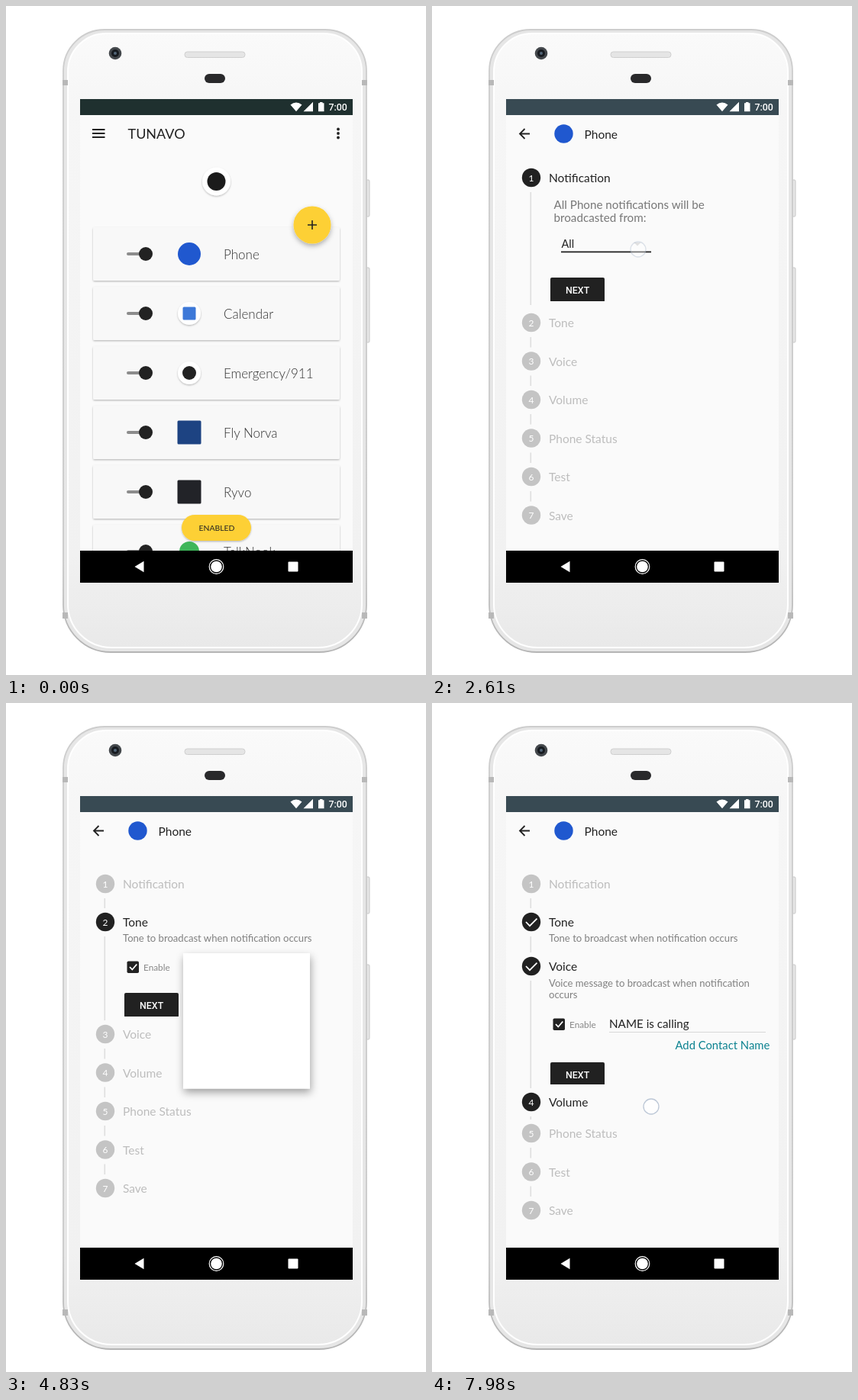
These frames come from a looping animation (550 by 877 pixels, 8 s). An HTML page:

```html
<!DOCTYPE html>
<html lang="en">
<head>
<meta charset="utf-8">
<title>Notification setup</title>
<style>
  html, body { margin: 0; width: 100%; height: 100%; overflow: hidden; background: #fff; }
  svg { display: block; }
  text { font-family: Lato, sans-serif; font-size: 15.5px; fill: #222; white-space: pre; }
  .app { font-size: 17px; font-weight: 300; fill: #333; }
  .title { font-size: 18px; }
  .pill { font-size: 10.4px; }
  .small { font-size: 13.1px; fill: #808080; }
  .tiny { font-size: 11.8px; fill: #888; }
  .note { font-size: 15.2px; fill: #777; }
  .item { font-size: 14.5px; }
  .link { font-size: 14.8px; fill: #0b8290; }
  .roboto { font-family: Roboto, sans-serif; font-weight: 500; font-size: 12.4px; fill: #fff; }
  .num { font-size: 12px; fill: #fff; text-anchor: middle; }
</style>
</head>
<body>
<svg id="stage" width="100%" height="100%" viewBox="0 0 550 877">
  <defs>
    <linearGradient id="shell" x2="0" y2="1">
      <stop offset="0" stop-color="#fafafa"/><stop offset=".12" stop-color="#f6f6f6"/>
      <stop offset=".85" stop-color="#f1f1f1"/><stop offset="1" stop-color="#e9e9e9"/>
    </linearGradient>
    <linearGradient id="rim" x2="0" y2="1">
      <stop offset="0" stop-color="#cdcdcd"/><stop offset=".85" stop-color="#c9c9c9"/><stop offset="1" stop-color="#b4b4b4"/>
    </linearGradient>
    <filter id="soft" x="-30%" y="-30%" width="160%" height="170%">
      <feDropShadow dx="0" dy="1.2" stdDeviation="1.1" flood-opacity=".27"/>
    </filter>
    <filter id="lift" x="-30%" y="-30%" width="160%" height="170%">
      <feDropShadow dx="0" dy="3" stdDeviation="3" flood-opacity=".3"/>
    </filter>
    <filter id="float" x="-30%" y="-30%" width="160%" height="160%">
      <feDropShadow dx="1" dy="5" stdDeviation="5.5" flood-opacity=".36"/>
    </filter>
    <clipPath id="screenClip"><rect x="97" y="122" width="357" height="634"/></clipPath>
  </defs>

  <g id="phone">
    <path d="M472 228h3q1 0 1 2v44q0 2-1 2h-3zM472 343h3q1 0 1 2v94q0 2-1 2h-3z" fill="#e6e6e6" stroke="#c8c8c8"/>
    <path d="M366 30h8v4h-8z" fill="#9b9b9b"/>
    <path d="M75 85A54 54 0 0 1 129 31H418A54 54 0 0 1 472 85V785A62 62 0 0 1 410 847H137A62 62 0 0 1 75 785Z" fill="#e6e6e6" stroke="url(#rim)" stroke-width="1.8"/>
    <path d="M81 86A50 50 0 0 1 131 36H416A50 50 0 0 1 466 86V784A57 57 0 0 1 409 841H138A57 57 0 0 1 81 784Z" fill="url(#shell)" stroke="#fff" stroke-width="2"/>
    <path d="M74 97h7v7h-7zM466 97h7v7h-7zM74 795h7v8h-7zM466 795h7v8h-7z" fill="#b8b8b8"/>
    <circle cx="143" cy="62" r="8.3" fill="#44484c"/>
    <circle cx="143" cy="62" r="5" fill="#171b20"/>
    <circle cx="143" cy="62" r="2" fill="#536678"/>
    <rect x="234" y="60" width="79" height="7.5" rx="3.5" fill="#e5e5e5" stroke="#cfcfcf"/>
    <rect x="260" y="89" width="27" height="12" rx="6" fill="#29292b"/>
  </g>

  <g clip-path="url(#screenClip)">
    <rect x="97" y="122" width="357" height="592" fill="#fafafa"/>
    <rect x="97" y="122" width="357" height="21" fill="#1f302f"/>
    <g id="list"></g>
    <rect x="97" y="714" width="357" height="42"/>
    <g id="page">
      <rect x="97" y="122" width="357" height="592" fill="#fafafa"/>
      <rect x="97" y="122" width="357" height="21" fill="#384a53"/>
      <path d="M128 167.500H115.500M121.500 161l-6.500 6.500 6.500 6.500" fill="none" stroke="#222" stroke-width="1.800"/>
      <circle cx="172.500" cy="167.500" r="12.200" fill="#2058cf"/>
      <text x="199.500" y="173.500">Phone</text>
      <g id="steps"></g>
      <g id="menu"></g>
    </g>
    <path d="M168.500 735l12-7.300v14.600z" fill="#fff"/>
    <circle cx="275.500" cy="735" r="7.300" fill="#fff"/>
    <circle cx="275.500" cy="735" r="9.300" fill="none" stroke="#fff" stroke-width="1.200"/>
    <rect x="369.500" y="728.500" width="13" height="13" rx="1" fill="#fff"/>
    <path d="M372.500 129.500q7.500-6 15 0l-7.500 8.800zM389.500 138.300h12.500v-12.500zM409 127.300h2v-1.300h3.500v1.300h2v11h-7.500z" fill="#fff"/>
    <text class="roboto" x="422.500" y="137">7:00</text>
    <circle id="touch" r="10" fill="#fff" fill-opacity=".75" stroke="#bcc7d6" stroke-width="1.300"/>
  </g>
</svg>
<script>
const LOOP = 8000;
const $ = id => document.getElementById(id);
const set = (el, attrs) => { for (const k in attrs) el.setAttribute(k, attrs[k]); };
const clamp = v => Math.min(1, Math.max(0, v));
const span = (t, from, to) => clamp((t - from) / (to - from));
const inOut = p => p < .5 ? 2 * p * p : 1 - 2 * (1 - p) ** 2;
const ease = (t, from, to) => inOut(span(t, from, to));
const mix = (a, b, p) => a + (b - a) * p;
const text = (x, y, str, cls = '') => `<text x="${x}" y="${y}" class="${cls}">${str}</text>`;
const line = (x1, x2, y) => `<rect x="${x1}" y="${y}" width="${x2 - x1}" height="1" fill="#d8d8d8"/>`;
const caret = (x, y) => `<path d="M${x - 4.5} ${y - 2}h9l-4.5 4.5z" fill="#cfcfcf"/>`;

// App list
const disc = (x, y, r, fill) => `<circle cx="${x}" cy="${y}" r="${r}" fill="${fill}"/>`;
const badge = (x, y, r, inner) => `<circle cx="${x}" cy="${y}" r="${r}" fill="#fff" filter="url(#soft)"/>${inner}`;
const square = (x, y, size, fill) =>
  `<rect x="${x - size / 2}" y="${y - size / 2}" width="${size}" height="${size}" rx="1.5" fill="${fill}"/>`;
const apps = [
  ['Phone', y => disc(240, y, 15, '#2058cf')],
  ['Calendar', y => badge(240, y, 15, square(240, y, 17, '#3d78d8'))],
  ['Emergency/911', y => badge(240, y, 15, disc(240, y, 9, '#222'))],
  ['Fly Norva', y => square(240, y, 31, '#1d4382')],
  ['Ryvo', y => square(240, y, 31, '#222328')],
  ['TalkNook', y => disc(240, y, 13, '#3fb65a')]
];
$('list').innerHTML =
  '<path d="M113 162h16.5M113 167h16.5M113 172h16.5" stroke="#222" stroke-width="1.8"/>' +
  text(159.5, 173.5, 'TUNAVO', 'title') +
  [161.5, 167, 172.5].map(y => disc(435, y, 1.9, '#222')).join('') +
  badge(275.5, 230, 18.5, disc(275.5, 230, 12, '#1b1b1b')) +
  apps.map(([name, icon], i) => {
    const y = 325 + 78 * i;
    return `<rect x="114" y="${y - 35}" width="323" height="70" rx="2" fill="#f8f8f8" filter="url(#soft)"/>
      <rect x="158" y="${y - 2}" width="25" height="4" rx="2" fill="#8c8c8c"/>` +
      disc(183, y, 9, '#222') + icon(y) + text(285, y + 6.5, name, 'app');
  }).join('') +
  `<circle cx="401" cy="287" r="24.5" fill="#fdd036" filter="url(#lift)"/>
   <path d="M395 287h12M401 281v12" stroke="#222" stroke-width="1.6"/>
   <rect x="230" y="667" width="91" height="34" rx="17" fill="#fdd036" filter="url(#soft)"/>` +
  text(252.5, 688, 'ENABLED', 'pill');

// Stepper; every panel is drawn relative to the centre of its step
const enable = y => `<rect x="158.5" y="${y - 7.5}" width="15.5" height="15.5" rx="1.8" fill="#222"/>
  <path d="M162 ${y}l3.3 3.5 6-7" fill="none" stroke="#fff" stroke-width="1.8"/>` +
  text(180, y + 4.5, 'Enable', 'tiny');
const panels = [
  { head: 12, foot: 28, buttonTop: 130, notes: '',
    row: text(159.5, 40.5, 'All Phone notifications will be', 'note') +
      text(159.5, 58, 'broadcasted from:', 'note') + text(169.5, 91.5, 'All', 'item') +
      caret(269, 87) + '<rect id="focus" x="169" width="118"/>' },
  { head: 26, foot: 23, buttonTop: 93,
    notes: text(153, 26, 'Tone to broadcast when notification occurs', 'small'),
    row: enable(59) + text(232, 64.5, 'PA', 'item') + line(232, 380, 69.5) +
      `<g id="toneCaret">${caret(362.5, 59)}</g>` },
  { head: 42, foot: 23, buttonTop: 126,
    notes: text(153, 26.5, 'Voice message to broadcast when notification', 'small') +
      text(153, 41.5, 'occurs', 'small'),
    row: enable(76) + '<text id="typed" class="note" x="232" y="80.5" style="fill:#222"></text>' +
      `<g id="voiceLine">${line(232, 437, 86)}</g>` +
      text(318.5, 109, 'Add Contact Name', 'link') }
];
const names = ['Notification', 'Tone', 'Voice', 'Volume', 'Phone Status', 'Test', 'Save'];
$('steps').innerHTML = names.map((name, i) => {
  const p = panels[i];
  return `<g id="step${i}"><rect id="rail${i}" x="128.5" y="19" width="1.6" fill="#dedede"/>
    <circle id="dot${i}" cx="130" r="12.2"/>
    <text id="num${i}" class="num" x="130" y="4.5">${i + 1}</text>
    <path id="tick${i}" d="M123 0l5 5.2 9.5-9.5" fill="none" stroke="#fff" stroke-width="1.7"/>
    <text id="name${i}" x="153" y="6">${name}</text>` +
    (p ? `<g id="notes${i}">${p.notes}</g>
      <svg id="row${i}" width="550">${p.row}</svg>
      <svg id="next${i}" x="155" width="71"><rect width="71" height="32" rx="2" fill="#212121"/>
      <text class="roboto" x="20" y="20.5">NEXT</text></svg>` : '') + '</g>';
}).join('');

// Tone menu
$('menu').innerHTML =
  '<rect id="sheet" x="232" y="328" width="166" fill="#fff" filter="url(#float)"/><g id="items">' +
  ['Tickle', 'Call', 'Calendar', 'Tulip - Ottila Renn', 'Emergency', 'PA', 'SMS'].map((name, i) => {
    const y = 349.5 + 41.6 * i, on = name === 'PA';
    return text(239, y + 5.5, name, 'item') +
      `<circle cx="377" cy="${y}" r="7.8" fill="none" stroke="${on ? '#222' : '#d6d6d6'}" stroke-width="${on ? 1.8 : 1.3}"/>` +
      (on ? disc(377, y, 4.3, '#222') : '');
  }).join('') + '</g>';

// Touch path: time, x, y, opacity
const touches = [
  [1290, 300, 325, 0], [1350, 300, 325, 1], [1500, 300, 325, 0],
  [2010, 437, 404, 0], [2040, 430, 400, 1], [2310, 270, 319, 1], [2460, 270, 319, 1], [2760, 270, 319, 0],
  [3239, 466, 404, 0], [3240, 464, 404, 1], [3540, 190, 371, 1], [3780, 190, 371, 1], [4020, 466, 440, 1], [4021, 466, 440, 0],
  [4410, 362, 347, 0], [4500, 362, 347, 1], [4650, 362, 347, 1], [4800, 362, 347, 0],
  [5639, 449, 404, 0], [5640, 449, 404, 1], [5940, 190, 396, 1], [6450, 190, 396, 1], [6600, 313, 446, 1], [6690, 380, 472, 0],
  [7799, 190, 478, 0], [7830, 190, 478, 1], [7980, 287, 529, 1], [8000, 287, 529, 1]
];
function drawTouch(t) {
  const i = touches.findIndex(k => k[0] > t);
  const b = touches[i], a = touches[i - 1] || b;
  const p = a === b ? 0 : span(t, a[0], b[0]);
  set($('touch'), { cx: mix(a[1], b[1], p), cy: mix(a[2], b[2], p), opacity: mix(a[3], b[3], p) });
}

function drawPanel(i, open, gap, closing, buttonHeight = 31) {
  const { head, foot, buttonTop } = panels[i];
  const tall = buttonHeight * (closing ? open ** 1.4 : clamp(2 * open - 1));
  const top = gap - foot - tall;
  const rowEnd = open === 1 ? top : head + (buttonTop - head) * open ** 1.4;
  const visibility = open > .02 ? 'visible' : 'hidden';
  set($('row' + i), { height: Math.max(0, rowEnd), visibility });
  set($('next' + i), { y: top, height: tall < 1 ? 0 : tall, visibility });
}

function drawSteps(t) {
  const toTone = ease(t, 3780, 4140), toneOpen = ease(t, 3780, 4050);
  const toVoice = ease(t, 6510, 6690), toVolume = ease(t, 7800, 7970);
  const current = t < 3800 ? 0 : t < 6510 ? 1 : t < 7830 ? 2 : 3;
  const gaps = [
    t < 3780 ? 190 : 50 + 128 * (1 - toTone),
    mix(mix(50.5, 147, toneOpen), 58, toVoice),
    mix(mix(50.5, 171, toVoice), 178, toVolume),
    mix(50.5, 41, toVolume), 50.5, 50.5, 0
  ];
  let y = t < 3780 ? 225 : 237;
  names.forEach((_, i) => {
    const done = i > 0 && i < current, active = i === current || done;
    set($('step' + i), { transform: `translate(0 ${y})` });
    set($('rail' + i), { height: Math.max(0, gaps[i] - (i || t >= 3780 ? 37 : 42)) });
    set($('dot' + i), { fill: active ? '#212121' : '#c4c4c4' });
    set($('num' + i), { visibility: done ? 'hidden' : 'visible' });
    set($('tick' + i), { visibility: done ? 'visible' : 'hidden' });
    $('name' + i).style.fill = active ? '#222' : '#bdbdbd';
    if (panels[i]) set($('notes' + i), { visibility: active ? 'visible' : 'hidden' });
    y += gaps[i];
  });
  drawPanel(0, 1 - toTone, gaps[0], true);
  drawPanel(1, toneOpen * (1 - toVoice), gaps[1], toVoice > 0);
  drawPanel(2, toVoice, gaps[2], false, mix(31, 29, toVolume));
  const focused = t >= 2550;
  set($('focus'), { y: focused ? 96.5 : 97, height: focused ? 1.8 : 1, fill: focused ? '#222' : '#dcdcdc' });
  set($('toneCaret'), { transform: `translate(0 ${-26 * toVoice})` });
  set($('voiceLine'), { transform: `translate(0 ${-38 * (1 - toVoice)})` });
  const phrase = 'NAME is calling';
  $('typed').textContent = phrase.slice(0, Math.ceil(phrase.length * span(t, 7020, 7290)));
}

function drawMenu(t) {
  const grow = ease(t, 4680, 4980);
  set($('menu'), { opacity: clamp(grow * 3) * (1 - span(t, 5700, 5880)) });
  set($('sheet'), { height: mix(60, 292, grow) });
  set($('items'), { opacity: span(grow, .6, 1) });
}

function draw(t) {
  const rise = 47 * (1 - span(t, 1510, 1860)) ** 1.8;
  set($('page'), { transform: `translate(0 ${Math.round(rise)})`, opacity: span(t, 1510, 1730) });
  drawSteps(t);
  drawMenu(t);
  drawTouch(t);
}

const start = performance.now();
function tick() {
  draw((performance.now() - start) % LOOP);
  requestAnimationFrame(tick);
}
tick();
</script>
</body>
</html>
```
